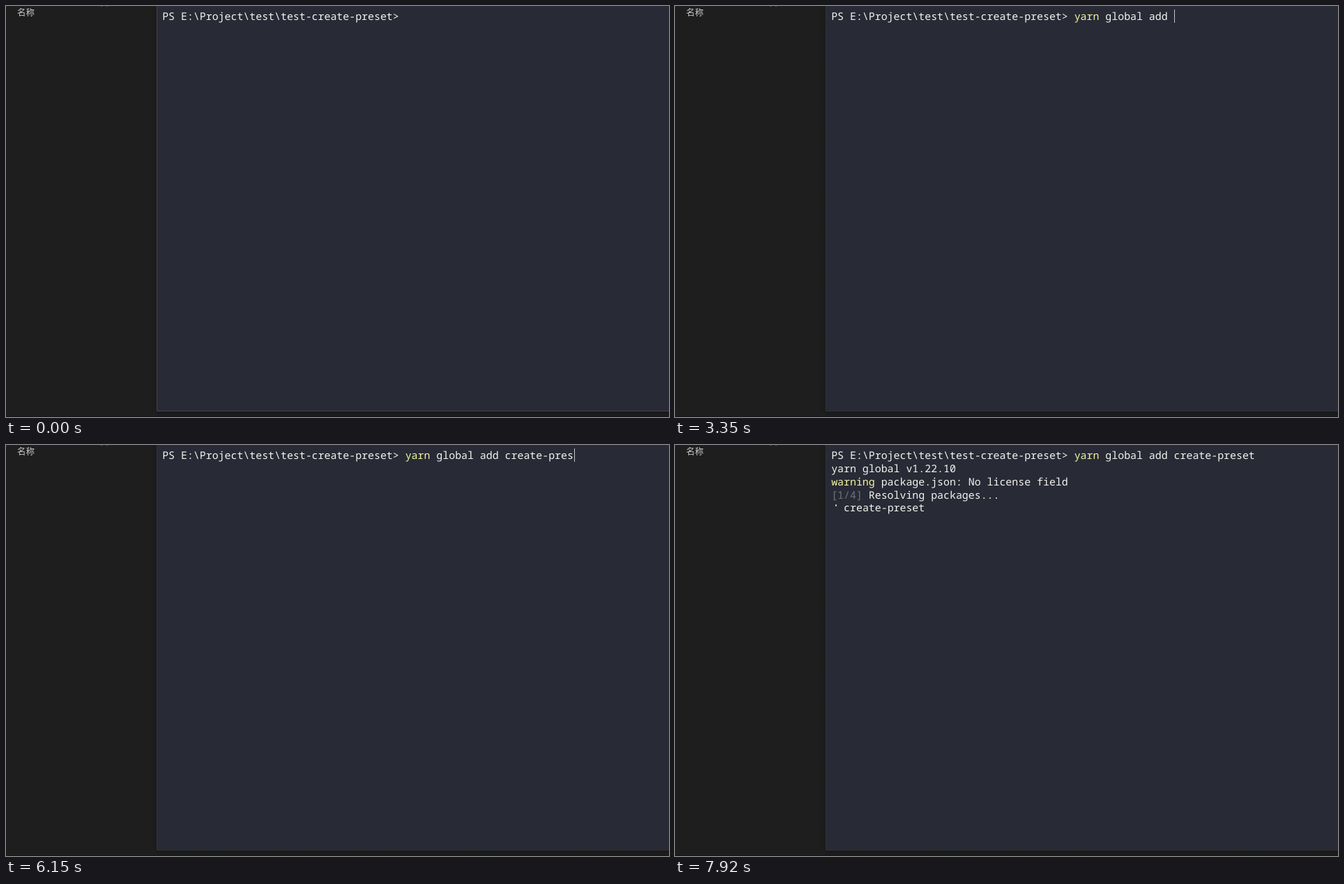
Recreate the animation shown at these times as an HTML page. Size 951x589 px, loop 7990 ms.

```html
<!DOCTYPE html>
<html lang="zh">
<head>
<meta charset="utf-8">
<title>Terminal</title>
<style>
html, body { margin: 0; width: 100%; height: 100%; overflow: hidden; background: #1e1e1e; }
svg { position: absolute; left: 0; top: 0; display: block; }
.term {
  font: 500 14.908px "Noto Sans Mono", "DejaVu Sans Mono", monospace;
  font-variant-ligatures: none;
  text-rendering: geometricPrecision;
  fill: #f4f4ef;
  white-space: pre;
}
.hot { fill: #f1f5a0; }
.dim { fill: #70727b; }
.label { font: 12.5px "Noto Sans CJK SC", "Noto Sans CJK", sans-serif; fill: #cccccc; }
#edge { fill: none; stroke: #30323a; animation: edge 7990ms step-end infinite; }
@keyframes edge { 0% { stroke: #42434a; } 4.881% { stroke: #30323a; } }
</style>
</head>
<body>
<svg width="951" height="589" viewBox="0 0 951 589">
  <defs>
    <linearGradient id="side"><stop offset="0" stop-color="#1e1e1e"/><stop offset="1" stop-color="#1b1b1b"/></linearGradient>
    <linearGradient id="foot" x2="0" y2="1"><stop offset="0" stop-color="#19191a"/><stop offset="1" stop-color="#1d1d1d"/></linearGradient>
  </defs>
  <rect width="951" height="589" fill="#1e1e1e"/>
  <rect x="206" width="10" height="581" fill="url(#side)"/>
  <rect x="216" y="581" width="735" height="7" fill="url(#foot)"/>
  <rect y="588" width="951" height="1" fill="#151515"/>
  <path d="M136 .5h2M144 .5h2" stroke="#55565a"/>
  <text class="label" x="16" y="14">名称</text>
  <rect x="216" width="735" height="581" fill="#282a35"/>
  <path id="edge" d="M216.5 0V580.5H951"/>
  <g class="term">
    <text x="224.2" y="20">PS E:\Project\test\test-create-preset&gt; <tspan id="cmd" class="hot"></tspan><tspan id="args"></tspan></text>
    <g id="head">
      <text x="224.2" y="39">yarn global v1.22.10</text>
      <text x="224.2" y="58"><tspan class="hot">warning</tspan> package.json: No license field</text>
    </g>
    <g id="resolve">
      <text x="224.2" y="77"><tspan class="dim">[1/4]</tspan> Resolving packages...</text>
      <text x="242.1" y="95.4">create-preset</text>
      <path id="spin"/>
    </g>
  </g>
  <rect id="caret" width="1" fill="#c3c4c6"/>
</svg>
<script>
const LOOP = 7990, LEFT = 224.5, CELL = 8.945, ROW = 18.85;
const PROMPT = 39, COMMAND = "yarn global add create-preset";
const KEYS = [
  1120, 1190, 1410, 1540, 1670, 1800, 2000, 2130, 2270, 2400,
  2530, 2800, 2900, 3000, 3200, 3350, 4150, 4350, 4480, 4680,
  5010, 5210, 5490, 5750, 5950, 6050, 6150, 6350, 6490
];
const SPINNER = "⠠⠐⠐⠒⠓⠋⠉⠈⠈";
const ENTER = 6890, HEADER = 7090, RESOLVE = 7160, SPIN = 7430;
const $ = id => document.getElementById(id);
const [cmd, args, head, resolve, spin, caret] =
  ["cmd", "args", "head", "resolve", "spin", "caret"].map($);

const within = (t, a, b) => t >= a && t < b;
const show = (el, on) => el.setAttribute("visibility", on ? "visible" : "hidden");

// Each braille bit is one dot: three down the left, three down the right.
function dots(char) {
  const bits = char.charCodeAt(0) - 0x2800;
  let d = "";
  for (let i = 0; i < 6; i++) {
    if (bits >> i & 1) d += `M${i < 3 ? 226 : 230} ${85.5 + i % 3 * 4}h2v2h-2z`;
  }
  return d;
}

function placeCaret(t, typed) {
  const on = within(t, 390, 920) || within(t, 1120, 3880) || within(t, 4080, RESOLVE);
  const row = t < ENTER ? 0 : t < HEADER ? 1 : 3;
  const col = row ? 0 : PROMPT + typed;
  const top = Math.round(5 + row * ROW);
  caret.setAttribute("x", Math.round(LEFT + col * CELL));
  caret.setAttribute("y", top);
  caret.setAttribute("height", Math.round(5 + (row + 1) * ROW) - top);
  show(caret, on);
}

function draw(t) {
  const typed = KEYS.filter(k => k <= t).length;
  const line = COMMAND.slice(0, typed);
  cmd.textContent = line.slice(0, 4);
  args.textContent = line.slice(4);
  show(head, t >= HEADER);
  show(resolve, t >= RESOLVE);
  const step = t < SPIN ? 0 : 1 + Math.floor((t - SPIN) / 70);
  spin.setAttribute("d", dots(SPINNER[Math.min(step, SPINNER.length - 1)]));
  placeCaret(t, typed);
}

const start = performance.now();
function tick() {
  draw((performance.now() - start) % LOOP);
  requestAnimationFrame(tick);
}
tick();
</script>
</body>
</html>
```
